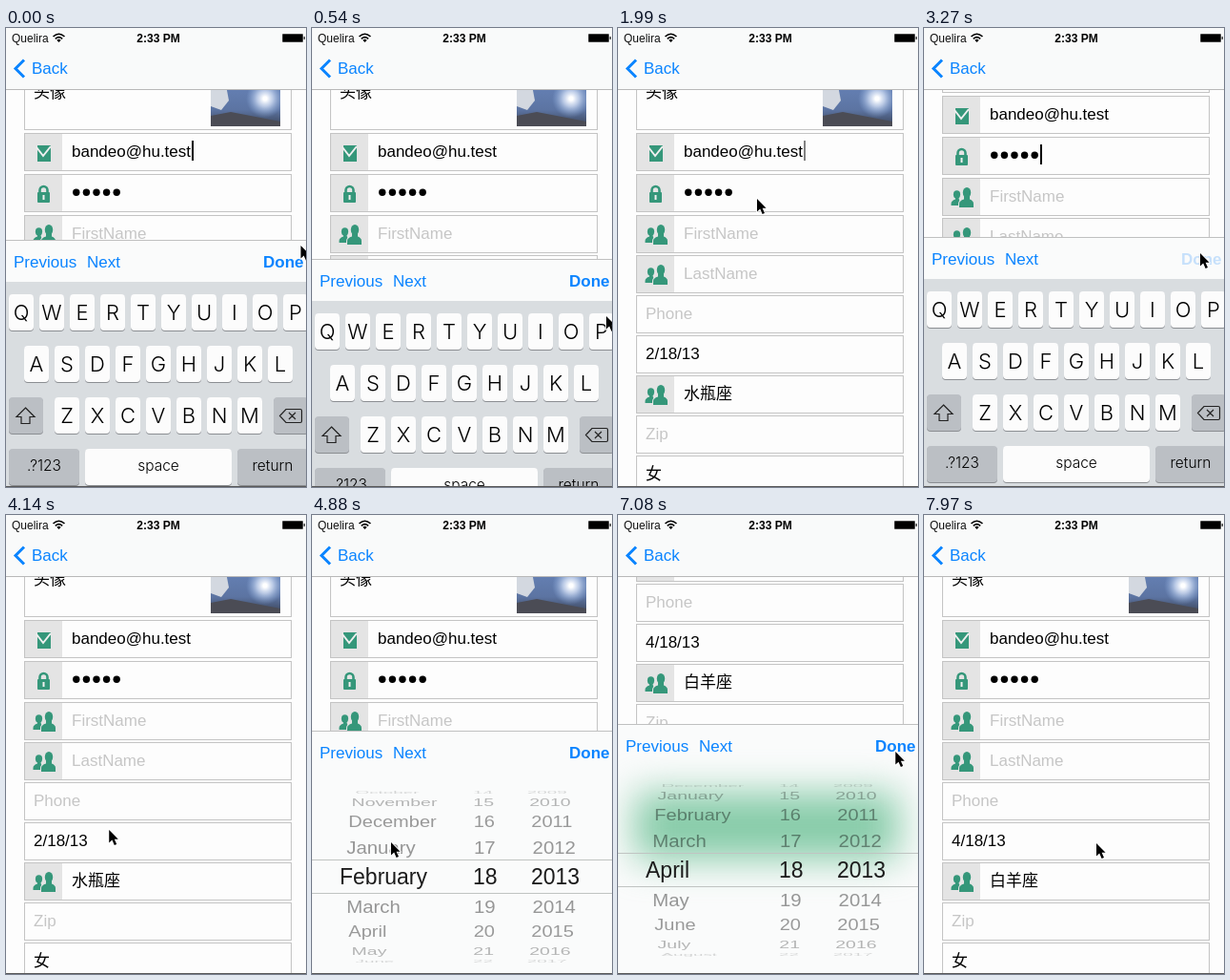
These frames come from a looping animation (315 px wide and 481 px high, 8 s). An HTML page with a canvas:

```html
<!DOCTYPE html>
<html lang="en">
<head>
<meta charset="utf-8">
<title>Form with keyboard and date picker</title>
<style>
html, body { margin: 0; width: 100%; height: 100%; overflow: hidden; background: #fdfdfd; }
canvas { display: block; width: 315px; height: 481px; }
</style>
</head>
<body>
<canvas></canvas>
<script>
const W = 315, H = 481, LOOP = 8000, PANEL = 219, DEPTH = 262, SLIDE = 400;
const canvas = document.querySelector('canvas'), c = canvas.getContext('2d');
const dpr = window.devicePixelRatio || 1;
canvas.width = W * dpr;
canvas.height = H * dpr;

const SANS = '"Liberation Sans", "Noto Sans CJK SC", "Noto Sans CJK", sans-serif';
const LIGHT = 'Inter, "Liberation Sans", sans-serif';
const BLUE = '#0a84ff', GREEN = '#35977a', LINE = '#c4c4c4', PAGE = '#fdfdfd';
const MONTHS = ['January', 'February', 'March', 'April', 'May', 'June', 'July',
  'August', 'September', 'October', 'November', 'December'];

// Each time a field has focus: its row, caret position, and how far the form scrolls
const sessions = [
  { open: -375, close: 468, row: 0, caret: 195, scroll: 0 },
  { open: 1560, close: 2030, row: 0, caret: 195, scroll: 0, bare: true },
  { open: 2030, close: 3420, row: 1, caret: 122, scroll: 39 },
  { open: 4520, close: 7580, row: 5, caret: 87, scroll: 208, wait: 430 }
];
// Pointer stops: arrival time, x, y
const stops = [[0, 309.5, 228], [300, 303, 238], [540, 309, 302], [1450, 150, 132],
  [1980, 146, 179], [3050, 290, 236], [4250, 83, 343], [5650, 90, 344], [6400, 92, 285],
  [6660, 295, 276], [7250, 290, 238], [7930, 181, 344]];

const clamp = v => Math.max(0, Math.min(1, v));
const sum = f => sessions.reduce((total, s) => total + f(s), 0);
const rowTop = i => 110 + 42 * i + Math.min(i, 2);

function ramp(t, start, length = SLIDE) {
  const p = clamp((t - start) / length);
  return p * p * (3 - 2 * p);
}

function pointer(t) {
  let [, x, y] = stops[0];
  stops.slice(1).forEach(([end, x1, y1], i) => {
    const length = Math.min(500, end - stops[i][0]), p = ramp(t, end - length, length);
    x += (x1 - x) * p;
    y += (y1 - y) * p;
  });
  return [x, y];
}

function text(s, x, y, color = '#000', size = 17, weight = 400, family = SANS, align = 'left') {
  c.font = `${weight} ${size}px ${family}`;
  c.textAlign = align;
  c.fillStyle = color;
  c.fillText(s, x, y);
}

function rect(x, y, w, h, color) {
  c.fillStyle = color;
  c.fillRect(x, y, w, h);
}

function round(x, y, w, h, r, color) {
  c.beginPath();
  c.roundRect(x, y, w, h, r);
  c.fillStyle = color;
  c.fill();
}

function oval(x, y, rx, ry, color) {
  c.beginPath();
  c.ellipse(x, y, rx, ry, 0, 0, 7);
  c.fillStyle = color;
  c.fill();
}

function path(d, { fill, stroke, width = 1 }) {
  const p = new Path2D(d);
  c.lineWidth = width;
  if (stroke) { c.strokeStyle = stroke; c.stroke(p); }
  if (fill) { c.fillStyle = fill; c.fill(p); }
}

function shifted(x, y, draw) {
  c.save();
  c.translate(x, y);
  draw();
  c.restore();
}

function clipped(x, y, w, h, draw) {
  c.save();
  c.beginPath();
  c.rect(x, y, w, h);
  c.clip();
  draw();
  c.restore();
}

// Icons are placed relative to their row's top left corner
const icons = {
  mail() {
    rect(14, 13, 14, 17, GREEN);
    path('M13 15 L20 24 L28 14', { stroke: '#f0f0f0', width: 2 });
  },
  lock() {
    path('M16.5 20 V17 A4 4 0 0 1 24.5 17 V20', { stroke: GREEN, width: 2.6 });
    round(14, 19, 13, 11, 1, GREEN);
    rect(19.5, 22, 2, 5, '#f0f0f0');
  },
  people() {
    oval(15.5, 17.5, 3.6, 4.2, GREEN);
    path('M9.5 29 V27 Q9.5 24 14 22.5 V20 H17 L20 29 Z', { fill: GREEN });
    path('M18 31 V27 Q18 24 23 22.5 V19 H29 V22.5 Q33 24 33 27 V31 Z',
      { fill: GREEN, stroke: '#e4e4e4', width: 2 });
    oval(26, 15.5, 4.2, 5.5, GREEN);
  }
};

function row(y, label, icon, color) {
  shifted(19, y, () => {
    rect(0, 0, 281, 40, LINE);
    rect(1, 1, 279, 38, PAGE);
    if (icon) {
      rect(1, 1, 39, 38, '#e4e4e4');
      icons[icon]();
    }
    text(label, icon ? 50 : 10, 25, color);
  });
}

function photo() {
  const sky = c.createLinearGradient(0, 60, 0, 103);
  sky.addColorStop(0, '#6580b4');
  sky.addColorStop(.6, '#5c74a2');
  sky.addColorStop(1, '#3b4458');
  rect(215, 30, 73, 73, sky);
  path('M215 60 H231 L234 76 L226 86 L215 82 Z', { fill: '#d3d8e0' });
  path('M215 92 L236 88 L288 98 V103 H215 Z', { fill: '#4b4c55' });
  const sun = c.createRadialGradient(272, 74, 2, 272, 74, 20);
  sun.addColorStop(0, '#fff');
  sun.addColorStop(.35, 'rgba(225,236,255,.7)');
  sun.addColorStop(1, 'rgba(150,185,235,0)');
  rect(215, 30, 73, 73, sun);
}

function form(t) {
  const changed = t > 6600, hint = '#c6c6c6';
  const fields = [['bandeo@hu.test', 'mail'], ['', 'lock'], ['FirstName', 'people', hint],
    ['LastName', 'people', hint], ['Phone', '', hint], [changed ? '4/18/13' : '2/18/13'],
    [changed ? '白羊座' : '水瓶座', 'people'], ['Zip', '', hint], ['女']];
  rect(19, 20, 281, 87, LINE);
  rect(20, 21, 279, 85, PAGE);
  text('头像', 29, 73);
  clipped(215, 30, 73, 73, photo);
  fields.forEach((field, i) => row(rowTop(i), ...field));
  for (let i = 0; i < 5; i++) oval(73.8 + i * 10.6, 172.3, 3.7, 3.7, '#000');

  const s = sessions.find(s => t >= s.open && t < s.close);
  if (!s) return;
  const phase = (t - s.open) % 1000;
  c.globalAlpha = clamp(phase < 700 ? (480 - phase) / 100 : (phase - 900) / 100);
  rect(s.caret, rowTop(s.row) + 8, 2, 21, '#000');
  c.globalAlpha = 1;
}

function navBar() {
  rect(0, 0, W, 64, '#f9fafa');
  rect(0, 64, W, 1, '#b8b8b8');
  text('Quelira', 6, 15, '#111', 12);
  text('2:33 PM', 160, 15, '#000', 12, 700, SANS, 'center');
  path('M49.5 9 Q55.5 3.5 61.5 9 M51.8 11.3 Q55.5 8 59.2 11.3', { stroke: '#000', width: 1.6 });
  path('M53.3 12.7 Q55.5 11 57.7 12.7 L55.5 15 Z', { fill: '#000' });
  path('M290.5 6.5 H311.5 V14.5 H290.5 Z', { stroke: '#888', fill: '#000' });
  rect(312.5, 9, 1.5, 3, '#444');
  path('M19 33.5 L10 42.5 L19 51.5', { stroke: BLUE, width: 3 });
  text('Back', 27, 48, BLUE);
}

function key(x, y, w, label, size = 22, color = '#fcfcfc') {
  round(x, y + 1, w, 38, 4, '#8b8e92');
  round(x, y, w, 38, 4, color);
  text(label, x + w / 2, y + 19 + size * (size > 20 ? .36 : .28), '#000', size, 300, LIGHT, 'center');
}

function keyboard() {
  const gray = '#bbbfc4', small = 15.5;
  rect(0, 263, W, 220, '#d9dde0');
  ['QWERTYUIOP', 'ASDFGHJKL', 'ZXCVBNM'].forEach((letters, r) =>
    [...letters].forEach((s, i) => key(163 + (i - letters.length / 2) * 32, 276 + r * 54, 26, s)));
  key(3, 384, 36, '', small, gray);
  key(281, 384, 36, '', small, gray);
  key(3, 438, 74, '.?123', small, gray);
  key(83, 438, 154, 'space', small);
  key(243, 438, 74, 'return', small, gray);
  path('M20.5 395 L30 404.5 H25 V411.5 H16 V404.5 H11 Z', { stroke: '#222', width: 1.2 });
  path('M287.5 403.5 L294 396.5 H309 Q310.5 396.5 310.5 398 V409 Q310.5 410.5 309 410.5 H294 Z '
    + 'M297 400 L304 407 M304 400 L297 407', { stroke: '#222', width: 1.2 });
}

// One drum: flat dark row in the band, gray rows turned 20 degrees each outside it
function wheel(x, bigX, pos, label) {
  const mid = Math.round(pos);
  for (let i = mid - 4; i <= mid + 4; i++) {
    const d = i - pos, a = d * Math.PI / 9, cos = Math.cos(a), s = .9 + .1 * cos;
    clipped(0, 355, W, 34, () => text(label(i), bigX, 380 + d * 34, '#1c1c1c', 23));
    if (cos <= 0) continue;
    clipped(0, d < 0 ? 270 : 390, W, 84, () => {
      c.translate(157 + (x - 157) * s, 372 + 90 * Math.sin(a));
      c.scale(s, cos);
      c.globalAlpha = Math.min(1, .2 + cos);
      text(label(i), 0, 7.3, 'rgba(0,0,0,.4)', 20.5);
    });
  }
}

function picker(t) {
  c.save();
  c.globalAlpha = ramp(t, 5390, 130);
  c.filter = `blur(${19 * dpr}px)`;
  rect(18, 291, 276, 70, '#86cba8');
  c.restore();
  rect(0, 354, W, 1, '#c0c4c2');
  rect(0, 389, W, 1, '#c0c4c2');
  wheel(35.5, 29, 1 + 2 * ramp(t, 6000, 560), i => MONTHS[(i + 12) % 12]);
  wheel(170, 169, 18, String);
  wheel(232, 230, 2013, String);
}

function panel(t) {
  const pressed = sessions.some(s => !s.bare && t >= s.close - 200 && t < s.close);
  rect(0, PANEL, W, 264, '#fafbfb');
  rect(0, PANEL, W, 1, '#c0c0c0');
  text('Previous', 8, 248, BLUE);
  text('Next', 85, 248, BLUE);
  text('Done', 270, 248, pressed ? '#c6e0fb' : BLUE, 17, 700);
  if (t > 4300) picker(t); else keyboard();
}

function draw(t) {
  const shown = sum(s => s.bare ? 0 : ramp(t, s.open) - ramp(t, s.close));
  const scroll = sum(s => s.scroll * (ramp(t, s.open + (s.wait || 0)) - ramp(t, s.close)));
  c.setTransform(dpr, 0, 0, dpr, 0, 0);
  rect(0, 0, W, H, PAGE);
  shifted(0, -Math.round(scroll), () => form(t));
  navBar();
  shifted(0, Math.ceil(DEPTH * (1 - shown)), () => panel(t));
  rect(0, 480, W, 1, '#5a5a5a');
  shifted(...pointer(t), () =>
    path('M0 0 V13.5 L3.2 10.6 L5.6 16 L8 15 L5.6 9.7 H9.6 Z', { fill: '#000', stroke: '#fff', width: 1.6 }));
}

function frame() {
  draw(performance.now() % LOOP);
  requestAnimationFrame(frame);
}
frame();
</script>
</body>
</html>
```
